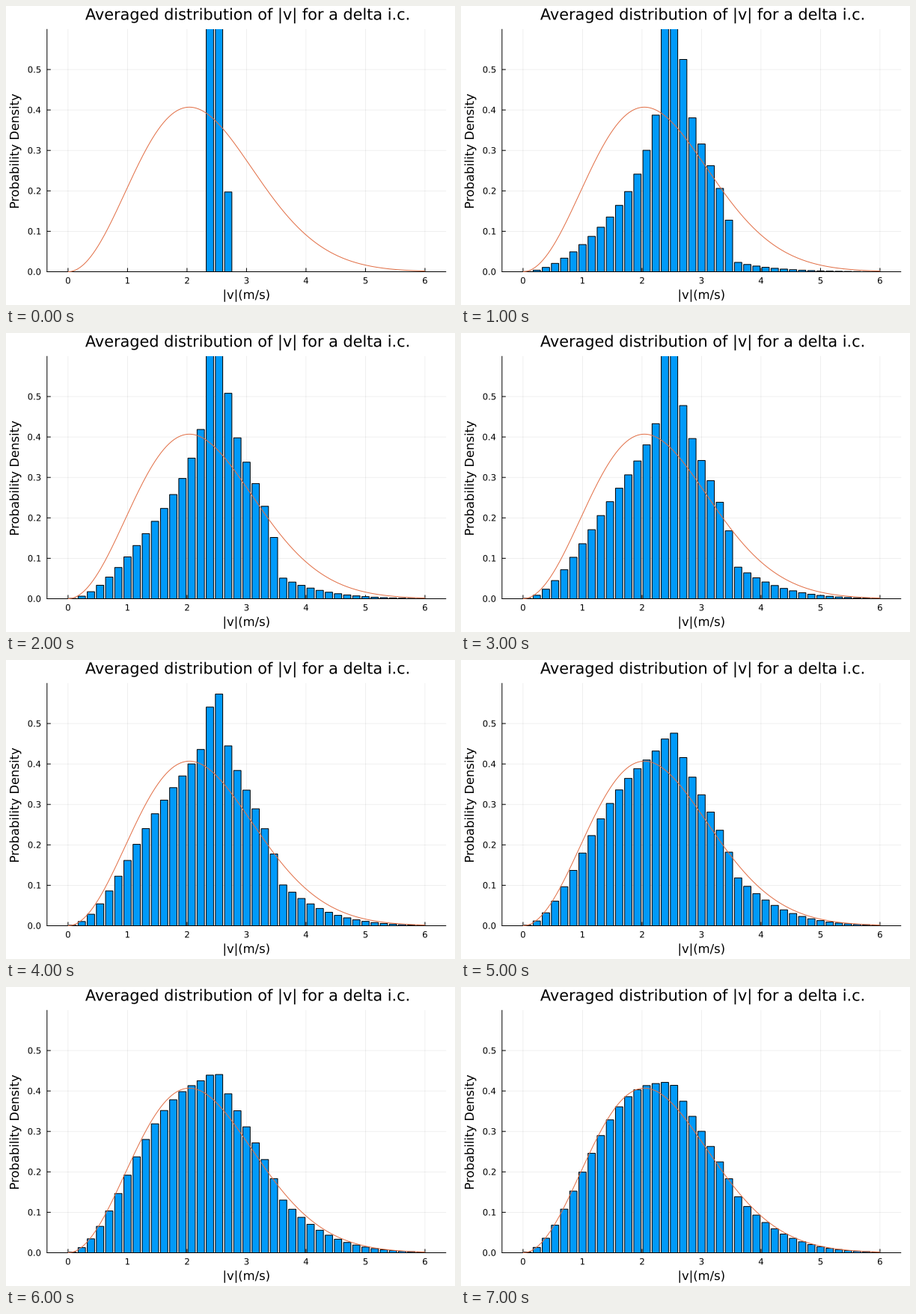
A matplotlib script that plays this animation: 600 by 400 pixels, repeating every 8000 ms.

```python
import numpy as np
import matplotlib.pyplot as plt
from matplotlib.animation import FuncAnimation
from matplotlib.patches import PathPatch, Rectangle
from matplotlib.textpath import TextPath
from matplotlib.transforms import Affine2D

W, H, DPI = 600, 400, 100
PX = 72 / DPI                       # points per pixel
BINS, V_MAX, FRAMES = 39, 6.0, 8
STEP = V_MAX / BINS
LEFT, RIGHT, TOP, BASE = 54.8, 588.2, 30.8, 355.5
BLUE, ORANGE = "#009af9", "#e26f46"
VP = 2.04                           # most probable speed
V0 = VP * np.sqrt(1.5)              # initial speed, same mean energy


def sx(v):
    return 82.9 + 79.5 * v


def sy(p):
    return BASE - 541.0 * p


def maxwell(v):
    return 4 / np.sqrt(np.pi) * v**2 / VP**3 * np.exp(-(v / VP)**2)


def first_collision(v):
    """Speeds after one collision of two particles that both move at V0."""
    e = np.abs((v / V0)**2 - 1)
    return v / V0**2 * np.arccos(np.minimum(e, 1))


def delta(v, lo=2.308, hi=2.625):
    """Binned density of speeds spread evenly from lo to hi."""
    overlap = np.minimum(v + STEP / 2, hi) - np.maximum(v - STEP / 2, lo)
    return np.maximum(overlap, 0) / STEP / (hi - lo)


def histogram(t):
    """Time-averaged mix: untouched, nudged, collided once, settled."""
    v = (np.arange(BINS) + 0.5) * STEP
    settled = 1 - np.exp(-(t / 3.8)**1.5)
    moving = (1 - settled) * (1 - np.exp(-5 * t))
    once = moving * (0.42 + 0.08 * t)
    nudge, spread = 0.42 * moving, 0.25
    rest = max(0, 1 - settled - once - 2 * nudge * spread)
    return (settled * maxwell(v) + once * first_collision(v)
            + nudge * np.exp(-np.abs(v - V0) / spread) + rest * delta(v))


fig = plt.figure(figsize=(W / DPI, H / DPI), dpi=DPI, facecolor="white")
ax = fig.add_axes([0, 0, 1, 1])
ax.set_xlim(0, W)
ax.set_ylim(H, 0)
ax.axis("off")


def line(xs, ys, color="black", width=1.0, **kw):
    ax.plot(xs, ys, color=color, lw=width * PX, snap=False,
            solid_capstyle="butt", **kw)


def label(x, y, text, size, align=0.5, angle=0):
    """Text outline with its ink aligned at x and its baseline at y."""
    path = TextPath((0, 0), text, size=size, prop="DejaVu Sans")
    box = path.get_extents()
    place = (Affine2D().translate(-box.x0 - align * box.width, 0)
             .rotate_deg(angle).scale(1, -1).translate(x, y))
    ax.add_patch(PathPatch(path.transformed(place), fc="black", lw=0))


for i in range(7):
    x = sx(i)
    line([x, x], [TOP, BASE], alpha=0.1, width=0.6, zorder=1)
    line([x, x], [BASE, BASE - 5], zorder=2)
    label(x, 371.4, str(i), 11.6)
for i in range(6):
    y = sy(i / 10)
    line([LEFT, RIGHT], [y, y], alpha=0.1, width=0.6, zorder=1)
    line([LEFT, LEFT + 5], [y, y], zorder=2)
    label(46.2, y + 4.2, f"{i / 10:.1f}", 11.6, align=1)
line([LEFT, LEFT], [TOP, BASE + 0.5], zorder=2)
line([LEFT, RIGHT], [BASE, BASE], zorder=2)

label(322, 18.4, "Averaged distribution of |v| for a delta i.c.", 20.8)
label(321.6, 391.9, "|v|(m/s)", 16.4)
label(17, 193.8, "Probability Density", 16.4, angle=90)

window = Rectangle((LEFT, TOP), RIGHT - LEFT, BASE + 1.5 - TOP,
                   transform=ax.transData)
bars = []
for k in range(BINS):
    bar = Rectangle((sx((k + 0.1) * STEP), BASE), sx(0.8 * STEP) - sx(0), 0,
                    facecolor=BLUE, edgecolor="black", lw=PX, zorder=3,
                    snap=False)
    ax.add_patch(bar)
    bar.set_clip_path(window)
    bars.append(bar)

speeds = np.linspace(0, V_MAX, 400)
line(sx(speeds), sy(maxwell(speeds)), ORANGE, zorder=4)


def update(i):
    for bar, p in zip(bars, histogram(i)):
        bar.set_height(sy(p) - BASE)
    return bars


anim = FuncAnimation(fig, update, frames=FRAMES, interval=1000,
                     init_func=lambda: update(0), repeat=True, repeat_delay=0)
plt.show()
```
